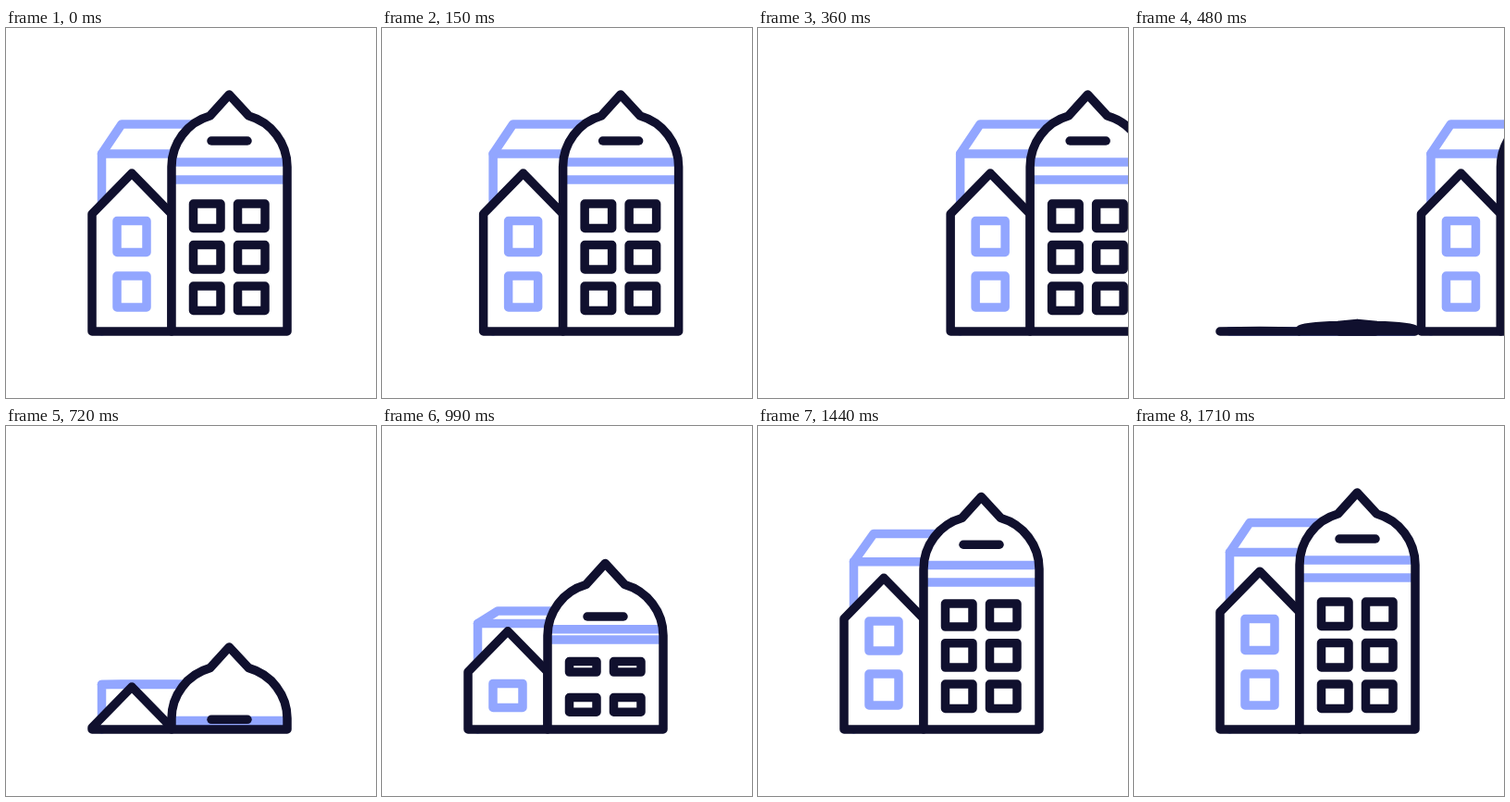
An HTML page with a canvas that plays this animation: 400x400 px, repeating every 1.74 s.

```html
<!DOCTYPE html>
<html lang="en">
<head>
<meta charset="utf-8">
<title>City buildings</title>
<style>
  html, body { margin: 0; width: 100%; height: 100%; overflow: hidden; background: #fff; }
  canvas { display: block; width: 400px; height: 400px; }
</style>
</head>
<body>
<canvas id="stage"></canvas>
<script>
const LOOP = 1740, STEP = 30, APPEAR = 430;
const GROUND = 328, DARK = '#10102e', LIGHT = '#92a6ff';
const LEFT = 93, WALL = 179, RIGHT = 304;

const canvas = document.getElementById('stage');
const ctx = canvas.getContext('2d');
const dpr = window.devicePixelRatio || 1;
canvas.width = canvas.height = 400 * dpr;

const mix = (a, b, u) => a + (b - a) * u;
const phase = (t, start, span) => Math.min(1, Math.max(0, (t - start) / span));

// Soft start with a long, slow finish.
const swell = (t, start, span) => 1 - (1 - phase(t, start, span) ** 1.4) ** 3.2;
// Quick start that slows down.
const settle = (t, start, span, power) => 1 - (1 - phase(t, start, span)) ** power;

function line(color, points, closed) {
  ctx.strokeStyle = color;
  ctx.beginPath();
  for (const [x, y] of points) ctx.lineTo(x, y);
  if (closed) ctx.closePath();
  ctx.stroke();
}

// A window opens from a flat line a little below its final place.
function drawWindow(color, x, top, w, h, drop, start, t) {
  if (t < start) return;
  const open = settle(t, start, 700, 3);
  const y1 = mix(top + drop, top, open), y2 = mix(top + drop, top + h, open);
  line(color, [[x, y1], [x + w, y1], [x + w, y2], [x, y2]], true);
}

function drawRear(t) {
  const y = GROUND - 192 * swell(t, 475, 1400);
  const top = y - 32 * swell(t, 700, 1080);
  line(LIGHT, [[103.5, GROUND], [103.5, y], [125, top], [212, top]]);
  line(LIGHT, [[103.5, y], [185, y]]);
}

function drawHouse(t) {
  const height = 171 * swell(t, 472, 1350);
  const top = GROUND - height, eave = top + 44 * Math.min(1, height / 46);
  const outline = [[LEFT, GROUND], [LEFT, eave], [136, top], [WALL, eave], [WALL, GROUND]];
  ctx.beginPath();
  for (const [x, y] of outline) ctx.lineTo(x, y);
  ctx.fill();
  [1010, 722].forEach((start, row) =>
    drawWindow(LIGHT, 120, 208.5 + 59.5 * row, 32, 34, 44.5, start, t));
  line(DARK, outline, true);
}

// The dome unfolds first, then the walls lift it.
function towerPath(height) {
  const unfold = Math.min(1, height / 90);
  const top = GROUND - height, side = top + 78 * unfold;
  const r = 57.2, a = Math.acos(15.7 / r);
  ctx.beginPath();
  ctx.moveTo(WALL, GROUND);
  ctx.ellipse(WALL + r, side, r, r * unfold, 0, Math.PI, Math.PI + a);
  ctx.lineTo(241.3, top);
  ctx.ellipse(RIGHT - r, side, r, r * unfold, 0, -a, 0);
  ctx.lineTo(RIGHT, GROUND);
  ctx.closePath();
}

function drawTower(t) {
  const height = 256 * swell(t, APPEAR, 1280);
  const lift = settle(t, 700, 1010, 2.65);
  towerPath(height);
  ctx.fill();
  for (const h of [183, 164]) {
    line(LIGHT, [[181, GROUND - h * lift], [302, GROUND - h * lift]]);
  }
  [1010, 868, 810].forEach((start, row) => {
    for (const x of [202.5, 250.5]) {
      drawWindow(DARK, x, 190 + 44.5 * row, 29.5, 26.5, 35.5, start, t);
    }
  });
  line(DARK, [[222, GROUND - 206 * lift], [261, GROUND - 206 * lift]]);
  towerPath(height);
  ctx.strokeStyle = DARK;
  ctx.stroke();
}

function drawCity(t, dx) {
  ctx.save();
  ctx.translate(dx, 0);
  drawRear(t);
  drawHouse(t);
  drawTower(t);
  ctx.restore();
}

function draw(t) {
  ctx.setTransform(dpr, 0, 0, dpr, 0, 0);
  ctx.fillStyle = '#fff';
  ctx.fillRect(0, 0, 400, 400);
  ctx.lineWidth = 9.5;
  ctx.lineCap = ctx.lineJoin = 'round';
  if (t >= APPEAR) drawCity(t, 0);
  // The finished city leaves to the right while a new one grows.
  const dx = 47 * (t / 240) ** 2.21;
  if (dx < 320) drawCity(Infinity, dx);
}

const begin = performance.now();
function tick() {
  const t = (performance.now() - begin) % LOOP;
  draw(Math.floor(t / STEP) * STEP);
  requestAnimationFrame(tick);
}
tick();
</script>
</body>
</html>
```
